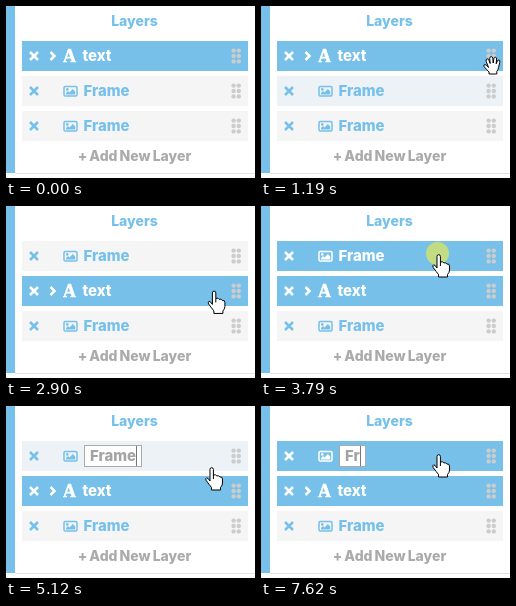
Recreate the animation shown at these times as an HTML page. Size 249 by 172 pixels, loop 8 s.

```html
<!DOCTYPE html>
<html lang="en">
<head>
<meta charset="utf-8">
<title>Layers</title>
<style>
  html, body { margin: 0; width: 100%; height: 100%; overflow: hidden; background: #fff; }
  svg { display: block; width: 249px; height: 172px; }
  text { font: 800 14.9px Inter, "Open Sans", sans-serif; fill: currentColor; }
  .label { font-size: 14px; text-anchor: middle; word-spacing: -1px; }
  .letter { font: 700 18px "Liberation Serif", serif; stroke: currentColor; stroke-width: .6; }
  .line { fill: none; stroke: currentColor; stroke-width: 2.5; }
  .field { fill: #fff; stroke: #aaa; }
  .field + text { fill: #a3a3a3; }
  .hand { stroke-linejoin: round; }
</style>
</head>
<body>
<svg viewBox="0 0 249 172">
  <defs>
    <g id="cross"><path class="line" d="M8 11l8 8m0-8l-8 8"/></g>
    <g id="grip" fill="#ccc"></g>
    <g id="picture">
      <rect x="42" y="10.5" width="13" height="9.5" rx="1.2" class="line" style="stroke-width:1.5"/>
      <circle cx="45.3" cy="13.4" r="1.3" fill="currentColor"/>
      <path d="M44 18.4v-1.5l2-2 1.5 1.5 3.3-3.4 2.4 2.5v2.9z" fill="currentColor"/>
    </g>
  </defs>
  <path d="M0 0H9V167H0z" fill="#76c0ea"/>
  <path d="M9 167.5H249" stroke="#e2e2e2"/>
  <text class="label" x="128.5" y="20" color="#76c0ea">Layers</text>
  <text class="label" x="128.5" y="155" color="#aaa">+ Add New Layer</text>
  <g id="first"></g>
  <g id="second"></g>
  <g id="styled"></g>
  <g id="edit">
    <rect class="field" x="78.5" y="39.5" height="21"/>
    <text x="84" y="55"></text>
    <path id="caret" d="M.5 40V60" stroke="#777"/>
  </g>
  <circle id="press" r="11.5" fill="#f4ee3c" opacity=".6"/>
  <path id="hand" class="hand"/>
</svg>
<script>
const $ = id => document.getElementById(id);
const BLUE = '#76c0ea', HOVER = '#ecf2f6', IDLE = '#f5f5f5';
const LOOP = 8000;

const POINT = 'M-1 14V2.5Q-1 .7.7.7Q2.4.7 2.4 2.5V8Q5 7 5.8 9Q8 8 8.8 10Q11.5 9.5 11.5 12V16' +
  'Q11.5 18.5 9.5 20.5V23H.5V20.5Q-1.5 18-4.8 13.5Q-5.8 11.2-4.3 10.8Q-2.8 11-1 14ZM2.4 8V12';
const OPEN = 'M-3.5 2.5L-5.8-3.5Q-6.3-6-4.8-6.2Q-3.6-6.2-3-4.5L-1.8-1.5L-2.3-6.5Q-2.2-8.4-.8-8.4' +
  'Q.6-8.4.8-6.5L1.2-2L1.8-6.4Q2.2-8 3.5-7.8Q4.8-7.5 4.6-6L4.2-1.2L5.4-4Q6-5.4 7.2-4.9' +
  'Q8.2-4.4 7.8-2.8L6.6 2.5Q6 5 4.8 6.5V9H-3V7Q-5 5-8 1.5Q-8.8-.2-7-.4Q-5.5-.3-3.5 2.5Z';
const FIST = 'M-4.5 1V-3Q-4.3-5-2.2-4.2Q-1.5-6.5.8-5Q2.5-6.5 3.8-4.5Q6.8-5.2 7-2V1.5' +
  'Q6.8 4.5 5 6V7.5H-3.5V5.5Q-5 4-6.8 1.5Q-7-.8-4.5 1Z';

// Pointer path: time, x, y
const PATH = [
  [400, 190, 3], [800, 212, 74], [1000, 229, 74], [1190, 231, 59], [1420, 231, 59],
  [1850, 233, 113], [2110, 233, 97], [2260, 233, 103], [2540, 233, 103], [2680, 219, 98],
  [3310, 178, 50], [3410, 177, 48], [4050, 177, 48], [4350, 238, 55], [4610, 205, 61],
  [4890, 205, 61], [5000, 236, 60], [5120, 205, 61], [5680, 177, 48], [LOOP, 177, 48]
];

for (let i = 0; i < 6; i++)
  $('grip').innerHTML += `<circle cx="${211.6 + i % 2 * 5.2}" cy="${9.6 + (i >> 1) * 5.4}" r="2.2"/>`;

const row = inner =>
  `<rect width="226" height="30"/><use href="#cross"/>${inner}<use href="#grip"/>`;
$('first').innerHTML = $('second').innerHTML =
  row('<use href="#picture"/><text x="61.5" y="20.3">Frame</text>');
$('styled').innerHTML = row('<path class="line" d="M28.5 11l4 4-4 4"/>' +
  '<text class="letter" x="41" y="21">A</text><text x="60.5" y="20.3">text</text>');

const within = (t, a, b) => t >= a && t < b;
const show = (el, on) => el.setAttribute('visibility', on ? 'visible' : 'hidden');

function place(id, x, y, back) {
  const g = $(id);
  g.setAttribute('transform', `translate(${x} ${y})`);
  g.setAttribute('color', back === BLUE ? '#fff' : BLUE);
  g.firstChild.setAttribute('fill', back);
}

function pointer(t) {
  const i = Math.max(1, PATH.findIndex(k => k[0] > t));
  const [t0, x0, y0] = PATH[i - 1], [t1, x1, y1] = PATH[i];
  const u = Math.max(0, (t - t0) / (t1 - t0)), e = u * u * (3 - 2 * u);
  return [x0 + (x1 - x0) * e, y0 + (y1 - y0) * e];
}

function drawField(t) {
  const on = t >= 4000;
  const [field, text, caret] = $('edit').children;
  text.textContent = t < 6650 ? 'Frame' : t < 6930 ? 'Fram' : t < 7490 ? 'Fra' : 'Fr';
  const end = 84 + Math.round(text.getComputedTextLength());
  field.setAttribute('width', end - 73);
  caret.setAttribute('transform', `translate(${end})`);
  show($('edit'), on);
  show(caret, on && !within(t, 5630, 6140) && !within(t, 6650, 7110) && !within(t, 7490, 7620));
  show($('first').querySelector('text'), !on);
}

function draw(t) {
  const [x, y] = pointer(t);
  const drag = within(t, 1420, 2540);
  const textX = drag ? x - 215 : 16;
  const textY = drag ? Math.max(35, y - 32) : t < 1420 ? 35 : 70;
  const swapped = t >= 1850 || textY > 50;

  let back = IDLE;
  if (within(t, 3790, 4000) || t >= 5500) back = BLUE;
  else if (t >= 2540 ? y < 65 : within(t, 400, 1420) && (y >= 70 || t >= 1000)) back = HOVER;
  place('first', 16, swapped ? 35 : 70, back);
  place('second', 16, 105, IDLE);
  place('styled', textX, textY, BLUE);
  drawField(t);

  const grab = t < 2680 && x > 222;
  const hand = $('hand');
  hand.setAttribute('d', drag ? FIST : grab ? OPEN : POINT);
  hand.setAttribute('fill', drag ? '#f8f58a' : '#fff');
  hand.setAttribute('stroke', drag ? '#66641c' : '#000');
  hand.setAttribute('transform', `translate(${x} ${y})`);
  $('press').setAttribute('transform', `translate(${x - .5} ${y - .5})`);
  show(hand, t >= 400);
  show($('press'), drag || within(t, 3790, 3890) || within(t, 3990, 4090));
}

const start = performance.now();
function tick() {
  draw((performance.now() - start) % LOOP);
  requestAnimationFrame(tick);
}
tick();
</script>
</body>
</html>
```
